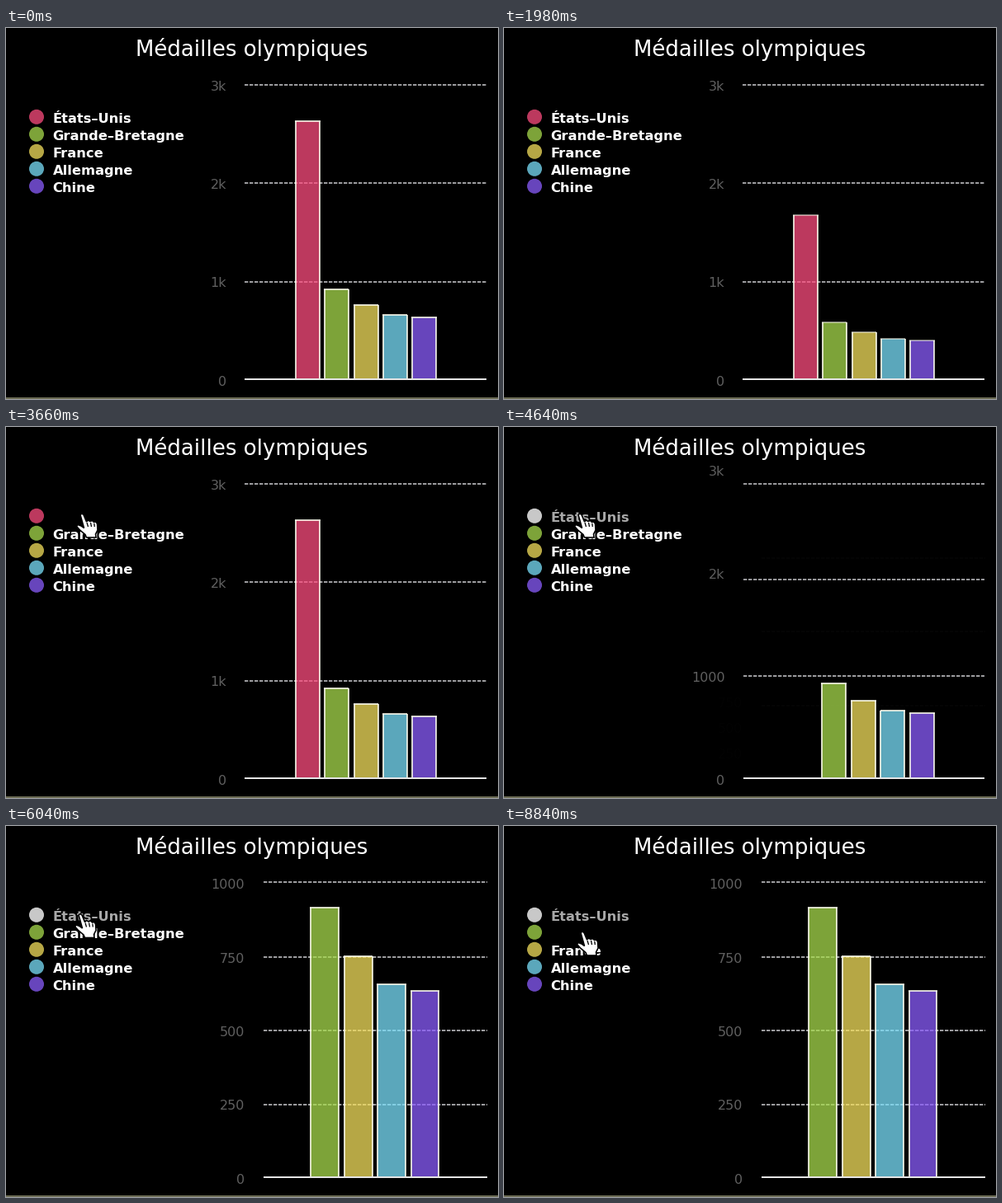
A matplotlib script that plays this animation: 596x450 px, repeating every 8860 ms.

```python
import matplotlib.pyplot as plt
import numpy as np
from matplotlib.animation import FuncAnimation
from matplotlib.patches import Circle, Polygon, Rectangle

W, H, DPI = 596, 450, 128
PX = 72 / DPI
STEP, LOOP = 20, 8860

WHITE = "#ffffff"
DIM = "#a8a8a8"
LABEL = "#606060"
GRID = "#d0d0d4"
BORDER = "#fffff0"
BASE = 426.5
GRID_BASE, GRID_TOP, GRID_STEP = 426.8, 68.2, 119.2
LABEL_BASE = 433.5
GROW, CLICK, HOVER_END = 7.8, 97, 185

# name, colour, left, right, top, and left, right, top after the rescale
SERIES = [
    ("États–Unis", "#fd4d7f", 351, 380, 112.5, 351, 380, 112.5),
    ("Grande–Bretagne", "#a8db4d", 385.5, 414.5, 316.5, 369, 403, 99),
    ("France", "#f5e05d", 421.5, 450.5, 336, 409.5, 443.5, 157.5),
    ("Allemagne", "#7be0fb", 456.5, 485.5, 348, 450, 484, 192),
    ("Chine", "#8b5dfd", 492, 521, 351, 490.5, 524, 199.5),
]

plt.rcParams["font.family"] = "DejaVu Sans"
fig = plt.figure(figsize=(W / DPI, H / DPI), dpi=DPI, facecolor="black")
ax = fig.add_axes([0, 0, 1, 1])
ax.set(xlim=(0, W), ylim=(H, 0))
ax.axis("off")


def text(x, y, s, size, color=WHITE, **kw):
    return ax.text(x, y, s, fontsize=size * PX, color=color, va="baseline", **kw)


def line(color, width, z, **kw):
    return ax.plot([], [], color=color, lw=width * PX, zorder=z,
                   solid_capstyle="butt", dash_capstyle="butt", **kw)[0]


def grid_line():
    return line(GRID, 1.5, 1, dashes=(4.4 / 1.5, 1.6 / 1.5))


def lerp(a, b, t):
    return a + (b - a) * t


def swing(p):
    return (1 - np.cos(np.pi * np.clip(p, 0, 1))) / 2


text(298, 34, "Médailles olympiques", 26, ha="center")
ax.add_patch(Rectangle((0, 448), W, 2, fc="#6c6c54", lw=0))

# Legend and bars
dots, names, bars = [], [], []
for i, (name, color, *_) in enumerate(SERIES):
    dots.append(ax.add_patch(Circle((37, 107.8 + 21 * i), 9, fc=color, alpha=0.75, lw=0)))
    names.append(text(56.5, 115.2 + 21 * i, name, 16.3, weight="bold"))
    fill = ax.add_patch(Rectangle((0, 0), 1, 1, fc=color, alpha=0.75, lw=0, zorder=2))
    bars.append((fill, *(line(BORDER, 1.6, 3) for _ in range(3))))

# Axis
OLD = (0, 1000, 2000, 3000)
NEW = (250, 500, 750)
old_labels = [text(0, 0, s, 16, LABEL, ha="right") for s in ("0", "1k", "2k", "3k")]
new_labels = [text(289, 0, str(v), 16, LABEL, ha="right") for v in NEW]
old_lines = [grid_line() for _ in OLD[1:]]
new_lines = [grid_line() for _ in NEW]
for ln, y in zip(new_lines, (338, 248, 159)):
    ln.set_data([312, 583], [y, y])
base = line("#e4e4e4", 2, 4)

# Pointers, as offsets from the tip
ARROW = np.array([(0, 0), (0, 28), (6.5, 22.5), (11, 33.5), (16, 31.5), (11.5, 21.5), (20.5, 21)])
HAND = np.array([
    (-1, 1.5), (1, 0), (3, 1.5), (6.5, 10), (8.5, 8), (11, 9.5), (13.5, 8.5),
    (15.5, 10.5), (18, 10), (19.5, 12.5), (20, 20), (17.5, 25), (18, 29),
    (6.5, 29), (5, 25.5), (-1.5, 20), (-5.5, 15.5), (-4, 13.5), (0, 15), (3.5, 17.5)])
KNUCKLES = np.array([(7, 11), (8.5, 16), (np.nan, np.nan), (11.5, 11), (12.5, 16),
                     (np.nan, np.nan), (15.8, 12), (16.3, 16)])
arrow = ax.add_patch(Polygon(ARROW, fc="black", ec=WHITE, lw=2 * PX, zorder=9))
hand = ax.add_patch(Polygon(HAND, fc=WHITE, ec="black", lw=1.6 * PX, zorder=9))
knuckles = line("black", 1.3, 10)

PATH_N = [46, 53, 61, 68, 74, 113, 130, 188, 190]
PATH_X = [72, 78, 84, 88, 91, 91, 89, 89, 94]
PATH_Y = [-35, 10, 66, 97, 105, 105, 106.5, 106.5, 128]


def step_at(ms):
    # Uneven playback: steps last 20, 100 and 20 ms in turn
    k, r = divmod(ms, 140)
    return 3 * k + (r >= 20) + (r >= 120)


def draw_bars(n, e, s):
    for i, (_, _, l0, r0, t0, l1, r1, t1) in enumerate(SERIES):
        fill, left, right, top = bars[i]
        l, r = lerp(l0, l1, e), lerp(r0, r1, e)
        y = BASE - (BASE - lerp(t0, t1, e)) * s
        fill.set_bounds(l, y, r - l, BASE - y)
        left.set_data([l, l], [y, BASE])
        right.set_data([r, r], [y, BASE])
        top.set_data([l - 0.8, r + 0.8], [y, y])
        top.set_alpha(s)
        for part in bars[i]:
            part.set_visible(i > 0 or n < CLICK)


def draw_axis(n, e):
    scale = 357.3 * lerp(1 / 3000, 1 / 1000, e)
    x0, x1 = lerp(289, 312, e), lerp(582, 583, e)
    base.set_data([x0, x1], [426, 426])
    old_labels[1].set_text("1k" if n < CLICK else "1000")
    for v, lab in zip(OLD, old_labels):
        y = LABEL_BASE - v * scale
        lab.set_position((lerp(267, 289, e), y))
        lab.set_alpha(1 if v <= 1000 else 1 - e)
        lab.set_visible(y > -5)
    for v, ln in zip(OLD[1:], old_lines):
        y = lerp(GRID_BASE - v / 1000 * GRID_STEP, GRID_TOP, e)
        ln.set_data([x0, x1], [y, y])
        ln.set_alpha(1 if v == 1000 else 1 - e)
    for v, lab, ln in zip(NEW, new_labels, new_lines):
        lab.set_y(LABEL_BASE - v * scale)
        for part in (lab, ln):
            part.set_alpha(e)
            part.set_visible(e > 0)


def draw_pointer(n):
    tip = np.array([np.interp(n, PATH_N, PATH_X), np.interp(n, PATH_N, PATH_Y)])
    on_item = n >= 46 and tip[1] > 98
    arrow.set_xy(ARROW + tip)
    hand.set_xy(HAND + tip)
    knuckles.set_data(*(KNUCKLES + tip).T)
    arrow.set_visible(n >= 46 and not on_item)
    hand.set_visible(on_item)
    knuckles.set_visible(on_item)
    return on_item


def draw(i):
    n = step_at(i * STEP)
    e = swing((n - CLICK) / 30)
    s = 1 if n == 0 else swing((n - GROW) / 60)
    draw_bars(n, e, s)
    draw_axis(n, e)
    on_item = draw_pointer(n)

    hidden = n >= CLICK
    dots[0].set_facecolor("#c8c8c8" if hidden else SERIES[0][1])
    dots[0].set_alpha(1 if hidden else 0.75)
    names[0].set_color(DIM if hidden else "black" if on_item else WHITE)
    names[1].set_color("black" if n >= HOVER_END else WHITE)
    return []


anim = FuncAnimation(fig, draw, frames=LOOP // STEP, interval=STEP,
                     repeat=True, repeat_delay=0, blit=False)
plt.show()
```
